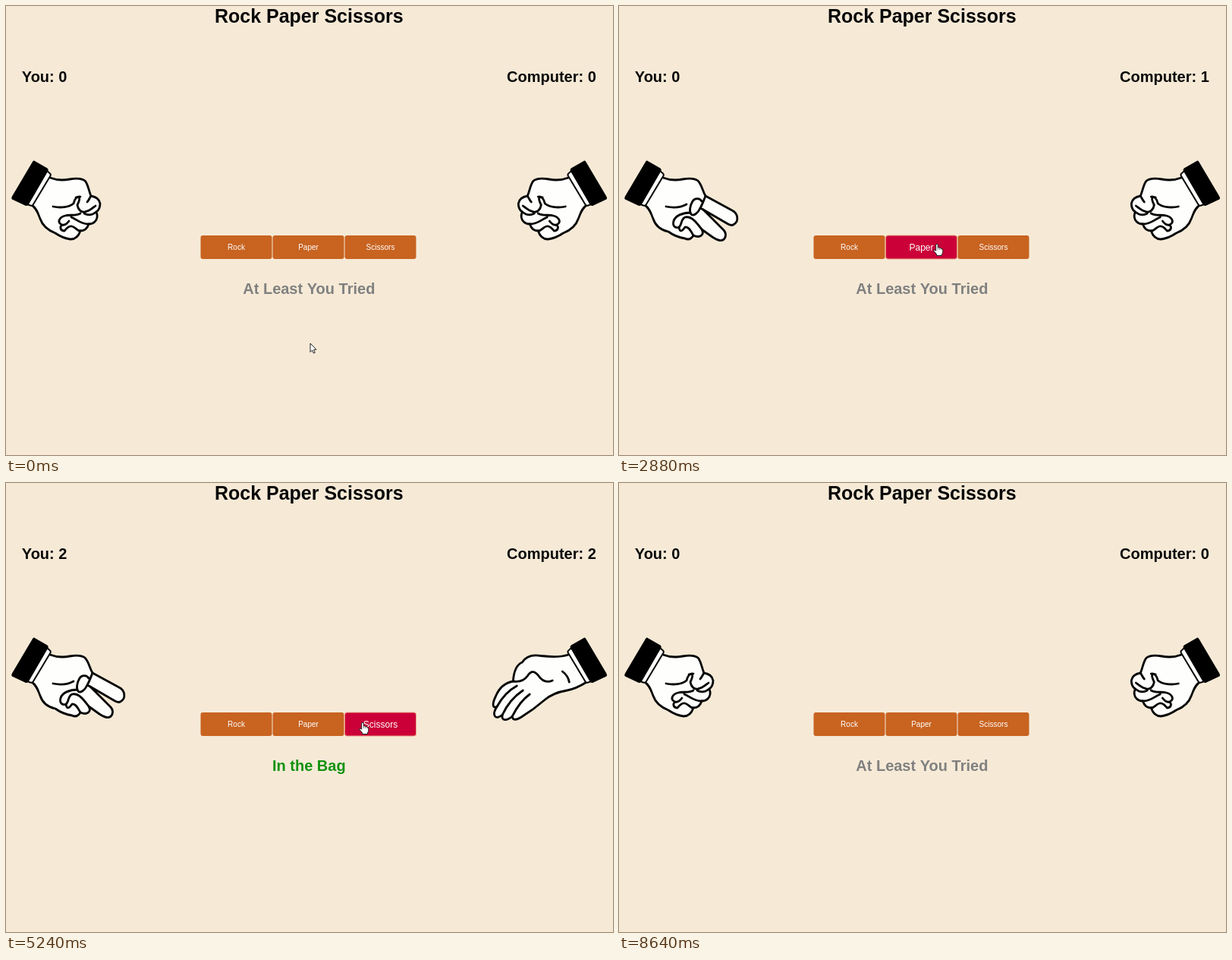
Animation, 800 px wide and 591 px high, one loop 8.76 s. Source, as an HTML page with a canvas:

```html
<!DOCTYPE html>
<html lang="en">
<head>
<meta charset="utf-8">
<title>Rock Paper Scissors</title>
<style>
html, body { margin: 0; width: 100%; height: 100%; overflow: hidden; background: #f6ead7; }
canvas { display: block; width: 800px; height: 591px; }
</style>
</head>
<body>
<canvas id="stage" width="800" height="591"></canvas>
<script>
const ctx = document.getElementById('stage').getContext('2d');
const LOOP = 8760;
const FONT = '"Liberation Sans", Arial, sans-serif';
const ORANGE = '#c86320';

const path = (...parts) => new Path2D(parts.join(' '));

const cuff = path('M37 203.5 L54.5 213.5 Q56.5 215 55.5 217 L30 261 Q28 264 25 262.5',
  'L8 254.5 Q6.5 253 8 250.5 L35 205 Q36 203 37 203.5 Z');
const band = path('M54 217 L57.5 220 Q59.5 221.5 58.5 223.5 L36 261 Q34.5 263.5 32 262.5 L28 261 Z');

const wrist = 'M58 226 C68 230 76 229.5 84 228 C92 226.5 100 227 104 230';
const heel = 'C55 295 48 289 45 280 C42 273 41 267 34 262';

// Each gesture: a filled outline and the lines inside it.
const hands = {
  rock: [
    path(wrist, 'C108 234 109 243 112 250 C118 251 123 254 124 260 C124 265 122 269 119 271',
      'C121 276 120 281 117 284 C115 286 112 287 109 287 C107 293 104 296 98 296',
      'C96 302 92 307 85 307 C77 306 71 303 65 299', heel),
    path('M62 264 C72 266 83 265 89 260 C90 254 94 250 98 251',
      'M92 252 C100 249 96 258 94 262 C95 268 99 272 104 271 C110 270 114 266 118 263',
      'M112 250 C110 253 109 256 107 258 M119 271 C114 275 108 276 103 273',
      'M98 273 C92 277 84 274 78 276 C70 278 68 284 72 287 C76 290 80 287 83 283',
      'M86 278 C94 281 98 287 109 287 M74 288 C70 291 72 296 77 296',
      'M77 296 C80 292 83 289 87 290 C92 291 93 296 98 296')
  ],
  paper: [
    path('M58 226 C70 230 82 229 94 227.5 C105 225.5 114 228 119 236 C126 239 130 247 131 261',
      'C142 263 150 271 154 281 C159 291 158 298 152 294 C160 306 154 313 145 305',
      'C147 314 139 313 132 307 C132 313 126 312 120 308 C107 300 98 293 90 286',
      'C81 278 72 275 60 273 C49 271 42 267 34 262'),
    path('M79 260 C88 264 94 259 98 253 C104 246 108 248 112 254 C117 261 124 262 131 261',
      'M126 267 C139 274 146 283 152 294 M118 273 C130 281 139 292 145 305',
      'M109 278 C120 286 127 297 132 307 M66 248 C62 251 58 256 57 262')
  ],
  scissors: [
    path(wrist, 'C109 235 110 243 114 250 L149 269 C157 273 158 283 152 287',
      'C149 290 145 288 142 286 L111 268 L138 295 C143 301 140 309 133 308.5',
      'C129 308 126 306 123 304 L109 294 C113 301 107 306 98 302 C95 307 91 308 87 306',
      'C80 305 72 302 65 297', heel),
    path('M62 264 C72 266 82 265 89 261 M114 250 C112 255 110 261 107 266 L111 268',
      'M107 266 C104 273 98 277 95 274 C92 270 94 262 97 257 C100 252 107 253 109 257',
      'M94 272 C84 272 74 276 72 283 C70 290 75 293 79 291 C83 289 81 281 87 278',
      'C96 276 103 286 109 294 M79 291 C80 298 83 297 87 291 C92 290 95 297 98 302')
  ]
};

const arrow = path('M0 0 V11.5 L2.7 9 L4.4 13 L6.3 12.2 L4.6 8.4 L8 8.2 Z');
const pointer = path('M-1.3 1 Q0 -.7 1.3 1 V5 Q2.8 4.2 3.7 5.5 Q5.2 5 6 6.4 Q7.8 6.3 7.8 8.5',
  'V11 Q7.5 13 6.3 14 V15.5 H-.3 V14 L-4 9.5 Q-4.6 7.7 -3 7.9 L-1.3 9.2 Z');

// start, player, computer, player score, computer score, state
const rounds = [
  [0, 'rock', 'rock', 0, 0, 'lose'],
  [950, 'rock', 'paper', 0, 1, 'lose'],
  [1430, 'paper', 'paper', 0, 1, 'lose'],
  [2450, 'scissors', 'rock', 0, 1, 'lose'],
  [2910, 'scissors', 'rock', 0, 2, 'lose'],
  [3610, 'rock', 'scissors', 1, 2, 'win'],
  [4520, 'scissors', 'paper', 2, 2, 'win'],
  [5850, 'paper', 'rock', 3, 2, 'over'],
  [7940, 'rock', 'rock', 0, 0, 'lose']
];

// time, x, y of the mouse
const track = [
  [0, 401, 444], [30, 401, 444], [800, 310, 316], [1000, 312, 318],
  [1400, 368, 316], [1640, 375, 317], [1760, 376, 317], [2300, 482, 314],
  [2560, 484, 314], [2880, 419, 313], [3300, 318, 318], [3600, 316, 319],
  [3790, 379, 322], [4350, 484, 316], [4550, 486, 316], [5240, 470, 315],
  [5700, 410, 318], [5950, 412, 317], [6240, 452, 316], [7100, 402, 506],
  [7900, 400, 508], [8300, 404, 516], [8640, 405, 516]
];

const buttons = [
  { label: 'Rock', x: 256.5, y: 302, w: 94, h: 31 },
  { label: 'Paper', x: 351.5, y: 302, w: 94, h: 31 },
  { label: 'Scissors', x: 446.5, y: 302, w: 94, h: 31 }
];
const restart = { label: 'Restart Game?', x: 320.5, y: 498, w: 156.5, h: 31 };

function mouseAt(t) {
  const i = track.findIndex(p => p[0] > t);
  if (i < 0) return null;
  const [t0, x0, y0] = track[i - 1], [t1, x1, y1] = track[i];
  const u = (t - t0) / (t1 - t0), k = u * u * (3 - 2 * u);
  return { x: x0 + (x1 - x0) * k, y: y0 + (y1 - y0) * k };
}

const inside = (m, b) => !!m && m.x >= b.x && m.x <= b.x + b.w && m.y >= b.y && m.y <= b.y + b.h;

function text(str, x, y, size, color, align = 'center', weight = 'bold') {
  ctx.font = `${weight} ${size}px ${FONT}`;
  ctx.textAlign = align;
  ctx.fillStyle = color;
  ctx.fillText(str, x, y);
}

function drawButton(b, over, disabled) {
  const hot = over && !disabled;
  ctx.beginPath();
  ctx.roundRect(b.x, b.y, b.w, b.h, 3);
  ctx.fillStyle = disabled ? '#800003' : hot ? '#cc0038' : ORANGE;
  ctx.fill();
  if (hot) {
    ctx.strokeStyle = '#e9a184';
    ctx.lineWidth = 1;
    ctx.stroke();
  }
  const size = hot ? 12 : 10;
  text(b.label, b.x + b.w / 2, b.y + 15.2 + size * 0.36, size,
    disabled ? '#85454a' : '#fff', 'center', 'normal');
}

function drawHand(kind, mirrored) {
  const [outline, lines] = hands[kind];
  ctx.save();
  if (mirrored) {
    ctx.translate(799.3, 0);
    ctx.scale(-1, 1);
  }
  ctx.lineJoin = ctx.lineCap = 'round';
  ctx.fillStyle = '#fefefc';
  ctx.strokeStyle = '#050505';
  ctx.lineWidth = 2.8;
  ctx.fill(outline);
  ctx.stroke(outline);
  ctx.stroke(lines);
  ctx.lineWidth = 2;
  ctx.fill(band);
  ctx.stroke(band);
  ctx.fillStyle = '#000';
  ctx.fill(cuff);
  ctx.restore();
}

function drawMouse(m, overButton) {
  const shape = overButton ? pointer : arrow;
  ctx.save();
  ctx.translate(m.x, m.y);
  ctx.lineJoin = 'round';
  ctx.lineWidth = 1;
  ctx.fillStyle = '#fff';
  ctx.strokeStyle = '#222';
  ctx.fill(shape);
  ctx.stroke(shape);
  if (overButton) {
    ctx.lineWidth = 0.6;
    ctx.stroke(path('M1.3 5 V8 M3.7 5.5 V8 M6 6.4 V8.4'));
  }
  ctx.restore();
}

function draw(t) {
  const [, left, right, you, cpu, state] = rounds.filter(r => r[0] <= t).pop();
  const over = state === 'over';
  const mouse = mouseAt(t);

  ctx.fillStyle = '#f6ead7';
  ctx.fillRect(0, 0, 800, 591);
  text('Rock Paper Scissors', 399.3, 22, 25, '#080808');
  text(`You: ${you}`, 20.8, 100, 20, '#080808', 'left');
  text(`Computer: ${cpu}`, 777.8, 100, 20, '#080808', 'right');
  drawHand(left, false);
  drawHand(right, true);
  buttons.forEach(b => drawButton(b, inside(mouse, b), over));

  if (over) {
    text('You Win', 399.3, 446, 40, '#069804');
    drawButton(restart, inside(mouse, restart), false);
  } else if (state === 'win') {
    text('In the Bag', 399.3, 379, 20, '#12920f');
  } else {
    text('At Least You Tried', 399.3, 379, 20, '#808080');
  }

  if (mouse) {
    const targets = over ? [...buttons, restart] : buttons;
    drawMouse(mouse, targets.some(b => inside(mouse, b)));
  }
}

const start = performance.now();
function tick(now) {
  draw(Math.max(0, now - start) % LOOP);
  requestAnimationFrame(tick);
}
draw(0);
requestAnimationFrame(tick);
</script>
</body>
</html>
```
